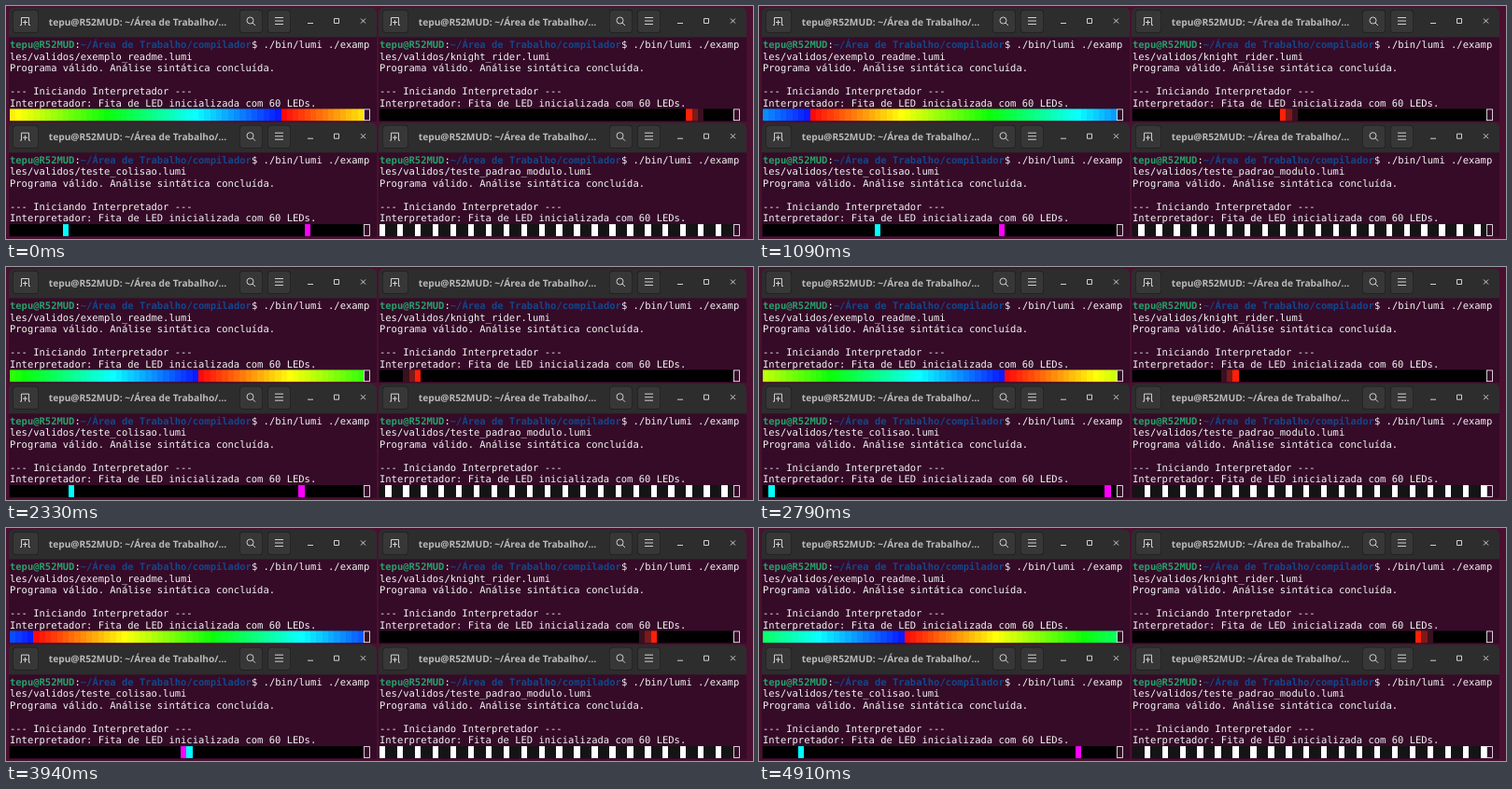
These frames come from a looping animation (800x250 px, 4.97 s). An HTML page with a canvas:

```html
<!DOCTYPE html>
<html lang="pt">
<meta charset="utf-8">
<title>Lumi</title>
<style>
  html, body { margin: 0; height: 100%; overflow: hidden; background: #4a1030; }
  canvas { display: block; }
</style>
<canvas id="stage" width="800" height="250"></canvas>
<script>
const ctx = document.getElementById('stage').getContext('2d');
const LEDS = 60, CELL = 6.316, ROW = 12.55, TOP = 35.2, LEFT = 4;
const LOOP = 4970, TICK = 4910 / 162, LAST_TICK = 162;
const USER = 'tepu@R52MUD';
const MONO = '10.49px "DejaVu Sans Mono", monospace';
const DESKTOP = '#4a1030', TERMINAL = '#350b28';

const steps = (t, period, phase) => Math.floor(t / period + phase);
const bounce = (n, max) => max - Math.abs(n % (2 * max) - max);

const rainbow = t => {
  const shift = 46 + steps(t, 50.2, 0.33);
  return i => `hsl(${4 * ((i - shift % LEDS + LEDS) % LEDS)} 100% 52%)`;
};
const scanner = t => {
  const n = 66 + steps(t, 40.1, 0.06);
  const trail = ['#ff2008', '#7c1a18', '#3a1020'];
  return i => trail.find((_, age) => bounce(n - age, LEDS - 1) === i) || '#000';
};
const collision = t => {
  const cyan = bounce(51 + steps(t, 40.1, 0.93), 30);
  return i => i === cyan ? '#0ff' : i === LEDS - 1 - cyan ? '#f0f' : '#000';
};
const modulo = t => {
  const n = steps(t, 100.2, 0.3);
  return i => (i + n) % 3 ? '#141414' : '#fff';
};

const terminals = [
  { x: 0, y: 0, file: 'exemplo_readme', pattern: rainbow },
  { x: 396, y: 0, file: 'knight_rider', pattern: scanner },
  { x: 0, y: 123.7, file: 'teste_colisao', pattern: collision },
  { x: 396, y: 123.7, file: 'teste_padrao_modulo', pattern: modulo },
];

function box(x, y, w, h, radius, color) {
  ctx.fillStyle = color;
  ctx.beginPath();
  ctx.roundRect(x, y, w, h, radius);
  ctx.fill();
}

function drawHeader() {
  box(3, 1.5, 394, 32, [6, 6, 0, 0], '#2d2d2d');
  for (const [x, w] of [[7, 28], [250, 25], [280, 25]]) {
    box(x, 4, w, 25, 4, '#1f1f1f');
    box(x + 0.7, 4.7, w - 1.4, 23.6, 3.5, '#373737');
  }

  ctx.strokeStyle = '#d0d0d0';
  ctx.lineWidth = 1;
  ctx.stroke(new Path2D(
    'M15 20.5H16.5V12.5H24.5V20.5H26M20.5 15V20.5M18 17.5H23' +
    'M265 15.5a3.5 3.5 0 1 1-7 0a3.5 3.5 0 1 1 7 0M264 18L267 21' +
    'M288 12.5H297M288 16H297M288 19.5H297' +
    'M323 18.5H329M351.5 13.5H356.5V18.5H351.5Z' +
    'M380 13.5L385 18.5M385 13.5L380 18.5'));

  ctx.font = 'bold 10.2px "Open Sans", sans-serif';
  ctx.fillStyle = '#bababa';
  ctx.textAlign = 'center';
  ctx.fillText(USER + ': ~/Área de Trabalho/…', 141, 20.6);
}

function print(row, col, text, color = '#f4f4f4', weight = '') {
  ctx.font = `${weight} ${MONO}`;
  ctx.fillStyle = color;
  ctx.textAlign = 'left';
  ctx.fillText(text, LEFT + col * CELL, TOP + row * ROW + 9.8);
}

function drawTerminal({ x, y, file }) {
  ctx.save();
  ctx.translate(x, y);
  box(3, 33, 394, 91, 0, TERMINAL);
  drawHeader();
  print(0, 0, USER, '#26a269', 'bold');
  print(0, 11, ':');
  print(0, 12, '~/Área de Trabalho/compilador', '#12488b', 'bold');
  print(0, 41, '$ ./bin/lumi ./examp');
  print(1, 0, `les/validos/${file}.lumi`);
  print(2, 0, 'Programa válido. Análise sintática concluída.');
  print(4, 0, '--- Iniciando Interpretador ---');
  print(5, 0, 'Interpretador: Fita de LED inicializada com 60 LEDs.');
  ctx.strokeStyle = '#fff';
  ctx.lineWidth = 0.8;
  ctx.strokeRect(383.4, 110.9, 6, 11.8);
  ctx.restore();
}

function drawStrip({ x, y, pattern }, t) {
  const color = pattern(t);
  const top = y + 110.4;
  const edge = i => Math.round(x + LEFT + i * CELL);
  ctx.fillStyle = TERMINAL;
  ctx.fillRect(edge(0), Math.floor(top), edge(LEDS) - edge(0), 14);
  for (let i = 0; i < LEDS; i++) {
    ctx.fillStyle = color(i);
    ctx.fillRect(edge(i), top, edge(i + 1) - edge(i), 12.8);
  }
}

function frame() {
  const now = performance.now() % LOOP;
  const t = Math.min(Math.floor((now + 5) / TICK), LAST_TICK) * TICK;
  terminals.forEach(term => drawStrip(term, t));
  requestAnimationFrame(frame);
}

ctx.textRendering = 'geometricPrecision';
ctx.fillStyle = DESKTOP;
ctx.fillRect(0, 0, 800, 250);
terminals.forEach(drawTerminal);
frame();
</script>
</html>
```
